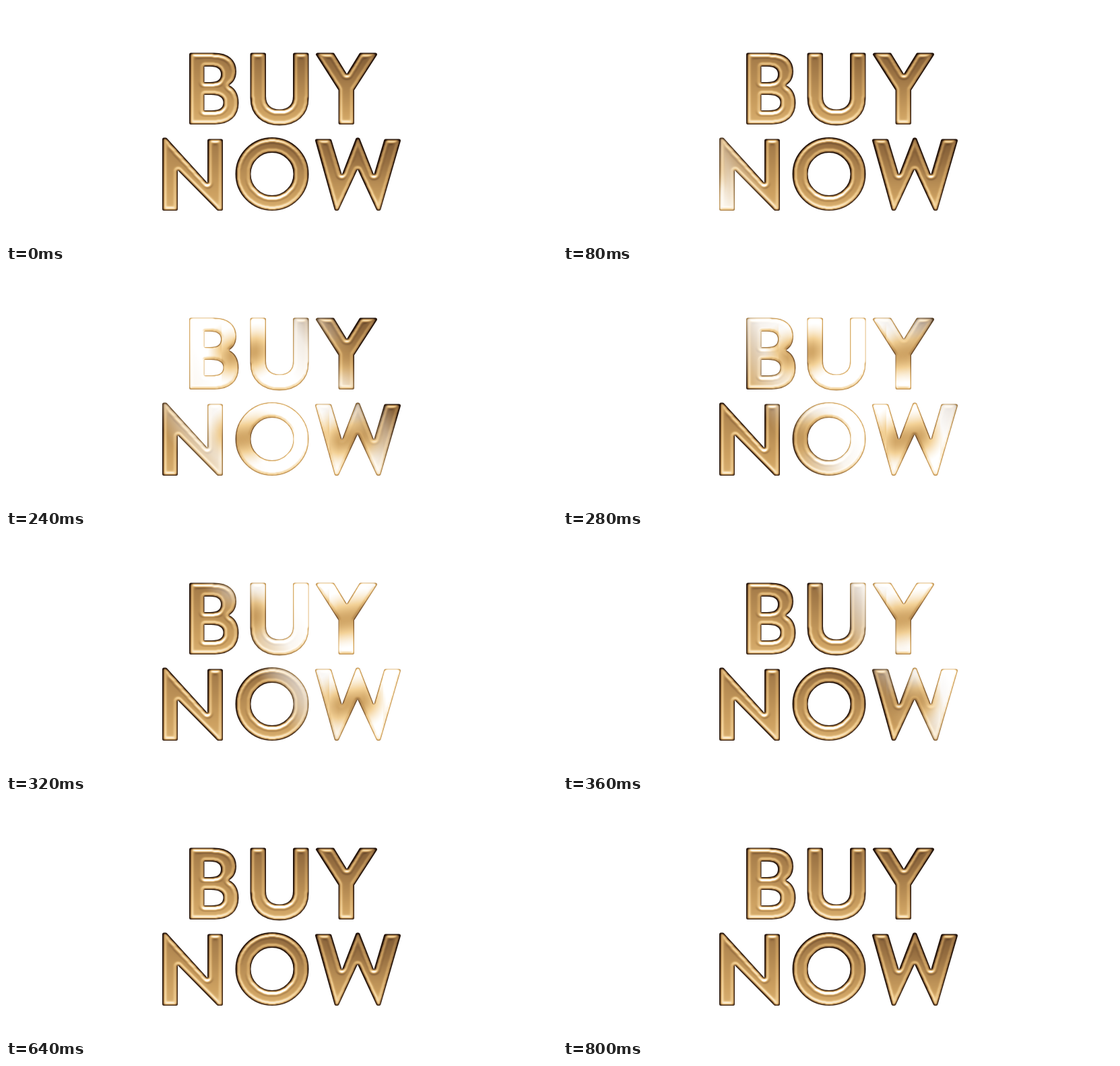
These frames come from a looping animation (818x352 px, 840 ms). An HTML page with a canvas:

```html
<!DOCTYPE html>
<html lang="en">
<head>
<meta charset="utf-8">
<title>Buy now</title>
<style>
html, body { margin: 0; width: 100%; height: 100%; overflow: hidden; background: #fff; }
canvas { display: block; width: 818px; height: 352px; }
</style>
</head>
<body>
<canvas id="stage" width="818" height="352" role="img" aria-label="BUY NOW"></canvas>
<script>
const W = 818, H = 352, LOOP = 840, STEP = 40;
const ctx = document.getElementById('stage').getContext('2d');

const letters = [
  // B
  'M274.5 72H309C329 72 339.5 82 339.5 97C339.5 108 335 113 326 118C338 122 343 132 343 144C343 162 331 173.5 310 173.5H274.5Z' +
  'M292 87.5V115.5H303C316 115.5 321.5 109.5 321.5 101.5C321.5 92 315 87.5 303 87.5Z' +
  'M292 129.5V157.5H305C319 157.5 325 152.5 325 143.5C325 134.5 318 129.5 304 129.5Z',
  // U
  'M365 72H383.5V134C383.5 149 393 156 406 156C419 156 428.5 149 428.5 134V72H447V137C447 160 431 175 406 175C381 175 365 160 365 137Z',
  // Y
  'M462.5 72H485.5L506 105.5L526.5 72H548.5L514.5 124.5V173.5H496V124.5Z',
  // N
  'M234.5 198H237L301.5 269V200H319.5V301.5H315L252.5 238V301.5H234.5Z',
  // O
  'M343 249.5A52 52 0 0 1 447 249.5A52 52 0 0 1 343 249.5ZM361 249.5A34 34 0 0 1 429 249.5A34 34 0 0 1 361 249.5Z',
  // W
  'M461.5 200H481L498.5 258L521.5 198H523L546.5 258L563.5 200H583.5L554 301.5H552L522 237L492 301.5H490Z'
];

function layer() {
  const c = document.createElement('canvas');
  c.width = W;
  c.height = H;
  return c;
}

const clamp = v => Math.max(0, Math.min(1, v));
const bump = (v, mid, width) => Math.exp(-(((v - mid) / width) ** 2));

// Gold tones from shadow to glint
const tones = [
  [0, 38, 22, 12], [.25, 104, 72, 42], [.45, 150, 110, 64],
  [.65, 205, 161, 97], [.82, 243, 209, 150], [1, 255, 255, 255]
];
function gold(l) {
  l = clamp(l);
  let i = 1;
  while (l > tones[i][0]) i++;
  const a = tones[i - 1], b = tones[i], k = (l - a[0]) / (b[0] - a[0]);
  return [1, 2, 3].map(n => a[n] + (b[n] - a[n]) * k);
}

function drawMask() {
  const c = layer(), g = c.getContext('2d');
  g.lineWidth = 5;
  g.lineJoin = 'round';
  for (const d of letters) {
    const p = new Path2D(d);
    g.fill(p, 'evenodd');
    g.stroke(p);
  }
  return c;
}

// Distance from each inner pixel to the nearest edge
function edgeDistance(mask) {
  const px = mask.getContext('2d').getImageData(0, 0, W, H).data;
  const R = 13, near = [];
  for (let y = -R; y <= R; y++)
    for (let x = -R; x <= R; x++) near.push([Math.hypot(x, y), y * W + x]);
  near.sort((a, b) => a[0] - b[0]);
  const dist = new Float32Array(W * H);
  for (let i = 0; i < W * H; i++) {
    if (px[i * 4 + 3] < 128) continue;
    const hit = near.find(n => n[0] > R || px[(i + n[1]) * 4 + 3] < 128);
    dist[i] = hit ? hit[0] - .5 : R;
  }
  return dist;
}

function soften(src) {
  const out = new Float32Array(W * H);
  for (let i = W + 1; i < W * H - W - 1; i++) {
    let sum = 0;
    for (const r of [-W, 0, W]) sum += src[i + r - 1] + src[i + r] + src[i + r + 1];
    out[i] = sum / 9;
  }
  return out;
}

// Height within the line of text, 0 at the top
const level = y => clamp((y - (y < 187 ? 69 : 195)) / 108);
const slope = d => 1 - Math.min(1, d / 11.5);

function restTone(x, y, d, ox, oy) {
  const tilt = slope(d), v = level(y);
  const up = Math.max(0, -oy), down = Math.max(0, oy), left = Math.max(0, -ox);
  let l = .46 + .24 * v - .2 * (x - 340) / 356 * (1 - v);
  l += (.14 + .36 * up * up + .1 * down - .04 * ox) * bump(tilt, .6, .18);
  l -= .14 * up * bump(tilt, .25, .15);
  l -= .24 * left * bump(tilt, .86, .15);
  return l - .65 * clamp((2.5 - d) / 2);
}

// Same metal facing the light: white with soft gold reflections
function litTone(x, y, d, ox, oy) {
  const tilt = slope(d), v = level(y + .15 * (x % 80 - 40));
  const patch = clamp(.45 + .75 * Math.cos((x - 352) * Math.PI / 80)) * bump(v, .48, .25);
  let l = 1.03 - .36 * patch;
  l -= .2 * Math.max(0, oy) * bump(tilt, .8, .2);
  return l - .42 * clamp((2 - d) / 1.5);
}

function drawMetal(dist, tone) {
  const c = layer(), g = c.getContext('2d');
  const img = g.createImageData(W, H);
  for (let i = 0; i < W * H; i++) {
    const d = dist[i];
    let ox = 0, oy = 0;
    if (d > 0) {
      ox = (dist[i - 2] - dist[i + 2]) / 4;
      oy = (dist[i - 2 * W] - dist[i + 2 * W]) / 4;
    }
    img.data.set([...gold(tone(i % W, Math.floor(i / W), d, ox, oy)), 255], i * 4);
  }
  g.putImageData(img, 0, 0);
  return c;
}

const mask = drawMask(), dist = soften(soften(edgeDistance(mask)));
const rest = drawMetal(dist, restTone), lit = drawMetal(dist, litTone);
const beam = layer(), bctx = beam.getContext('2d');

// Slanted band of light: [offset from its middle, strength]
const LEAN = .6, HALF = 180;
const band = [[-180, 0], [-150, .4], [-105, .9], [-60, 1], [60, 1], [105, .85], [145, .4], [180, 0]];

function bandGradient(t) {
  const mid = 228 + 1.95 * (t - 160);
  // The gradient axis is square to the band's slant
  const k = 1 / (1 + LEAN * LEAN), yMid = 187;
  const dx = HALF * k, dy = -HALF * LEAN * k;
  const grad = bctx.createLinearGradient(mid - dx, yMid - dy, mid + dx, yMid + dy);
  for (const [off, s] of band) grad.addColorStop((off + HALF) / (2 * HALF), `rgba(0,0,0,${s})`);
  return grad;
}

function drawBeam(t) {
  bctx.globalCompositeOperation = 'copy';
  bctx.drawImage(lit, 0, 0);
  bctx.globalCompositeOperation = 'destination-in';
  bctx.fillStyle = bandGradient(t);
  bctx.fillRect(0, 0, W, H);
}

function draw(t) {
  drawBeam(t);
  ctx.globalCompositeOperation = 'copy';
  ctx.drawImage(rest, 0, 0);
  ctx.globalCompositeOperation = 'source-over';
  ctx.drawImage(beam, 0, 0);
  ctx.globalCompositeOperation = 'destination-in';
  ctx.drawImage(mask, 0, 0);
  ctx.globalCompositeOperation = 'destination-over';
  ctx.fillStyle = '#fff';
  ctx.fillRect(0, 0, W, H);
}

let start = null;
function tick(now) {
  if (start === null) start = now;
  const t = (now - start) % LOOP;
  draw(Math.floor(t / STEP) * STEP);
  requestAnimationFrame(tick);
}
draw(0);
requestAnimationFrame(tick);
</script>
</body>
</html>
```
